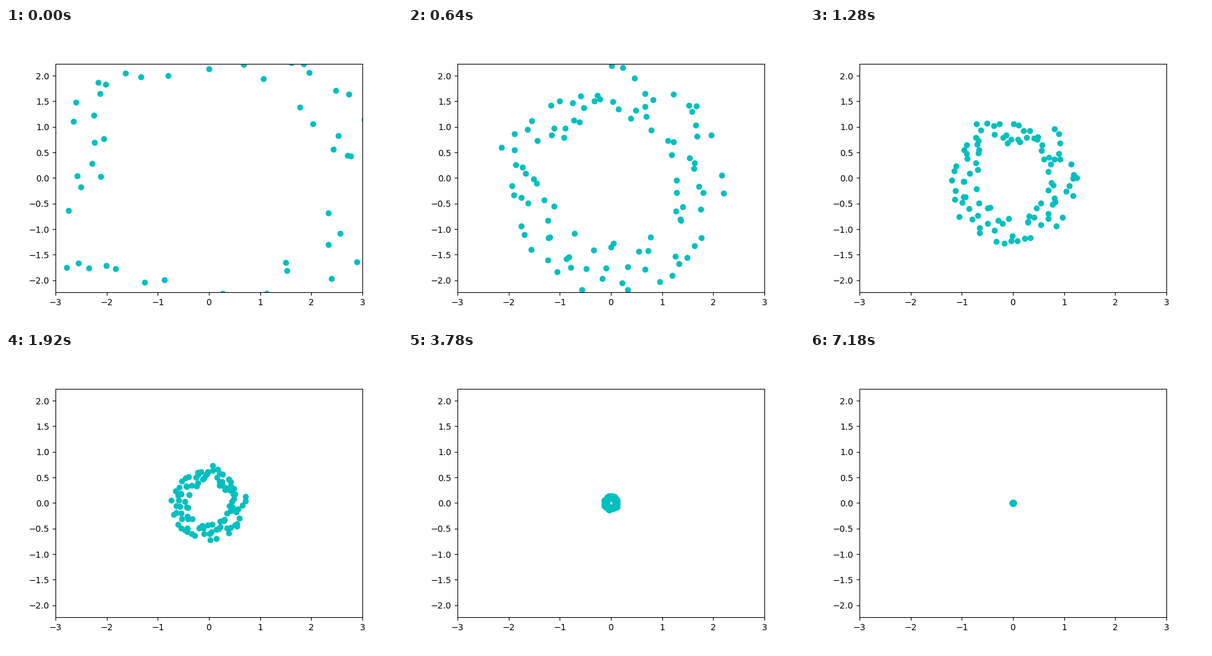
A matplotlib script for the animation above (7.2 s loop, 640 by 480 pixels).

```python
import numpy as np
import matplotlib.pyplot as plt
from matplotlib.animation import FuncAnimation

FRAMES = 360
COUNT = 100
INNER, OUTER = 2.12, 3.95   # radii of the starting ring
SPIN = 1.25                 # clockwise turn per unit of decay
HALF_W = 3
HALF_H = HALF_W * 369.6 / 496   # equal scale on both axes

# ring of points, spread evenly but loosely in angle and radius
rng = np.random.default_rng(7)
slots = np.arange(COUNT)
angle = 2 * np.pi * (slots + rng.uniform(-1, 1, COUNT)) / COUNT
radius = INNER + (OUTER - INNER) * rng.permutation(slots) / (COUNT - 1)
start = radius * np.exp(1j * angle)

fig, ax = plt.subplots(figsize=(6.4, 4.8), dpi=100)
ax.set_xlim(-HALF_W, HALF_W)
ax.set_ylim(-HALF_H, HALF_H)
dots, = ax.plot([], [], "co")


def update(i):
    # stable spiral: exponential decay with a steady clockwise turn
    t = 2 * np.pi * i / FRAMES
    z = start * np.exp(-(1 + SPIN * 1j) * t)
    dots.set_data(z.real, z.imag)
    return dots,


anim = FuncAnimation(fig, update, frames=FRAMES, interval=20,
                     repeat=True, repeat_delay=0, blit=False)
plt.show()
```
